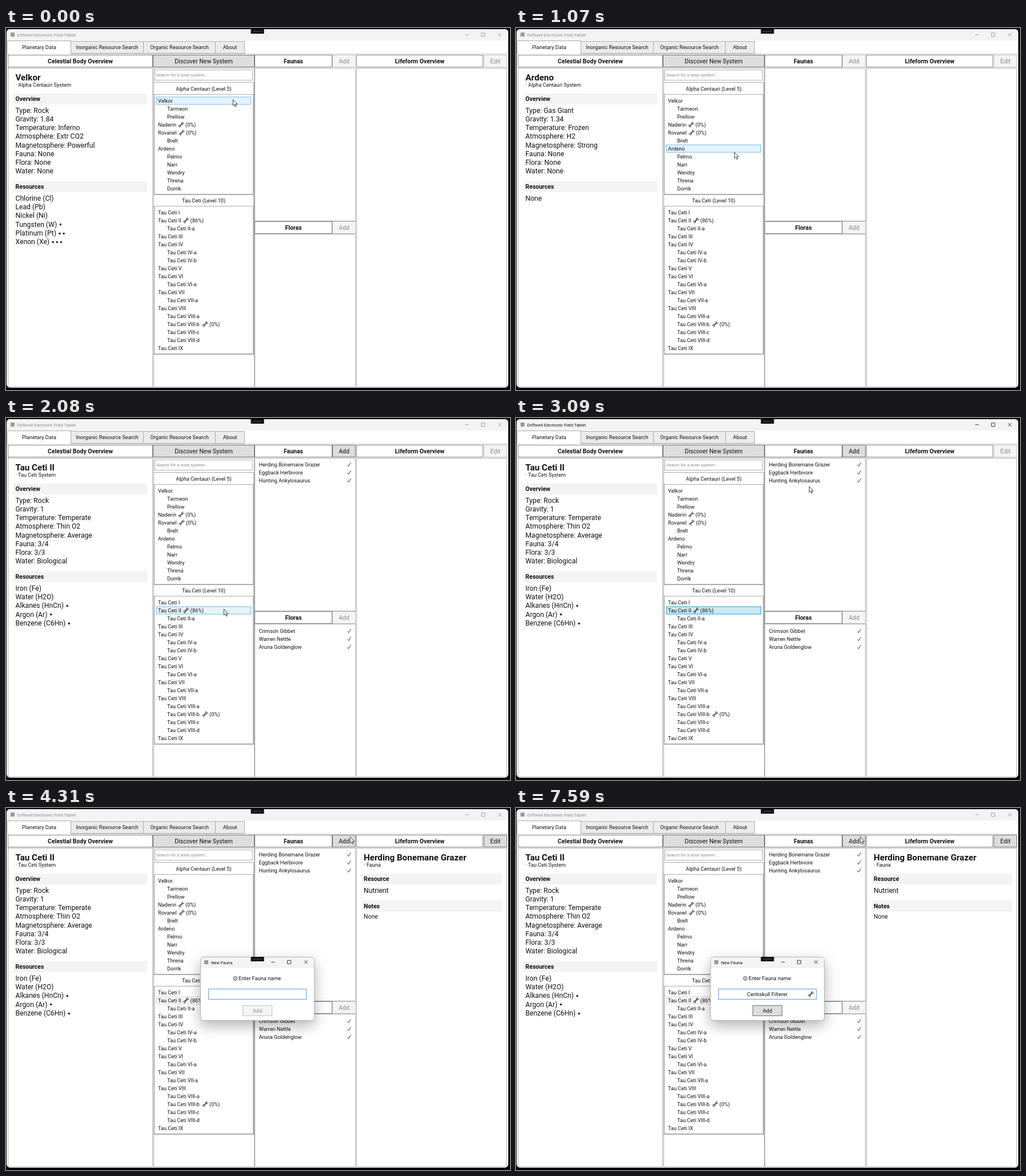
Write an HTML page that moves like this. It is 882 px wide and 635 px high and loops after 8 s.

```html
<!DOCTYPE html>
<html lang="en">
<head>
<meta charset="utf-8">
<title>Planet browser</title>
<style>
html, body { margin: 0; width: 100%; height: 100%; overflow: hidden; background: #000; }
svg { display: block; width: 882px; height: 635px; }
text { font: 9.2px Roboto, sans-serif; fill: #111; white-space: pre; }
.t { font-size: 7.5px; }
.m { font-size: 10.5px; }
.l { font-size: 12.16px; }
.h { font-size: 15.2px; }
.b { font-weight: 700; }
.c { text-anchor: middle; }
.off { fill: #8a8a8a; }
.dot { font: 5.5px "DejaVu Sans", sans-serif; }
.line { fill: none; stroke: #222; stroke-width: .9; }
#bar text { fill: #8c8c8c; }
#bar .line { stroke: #999; }
#bar.on text { fill: #111; }
#bar.on .line { stroke: #222; }
#box { filter: drop-shadow(0 9px 12px rgba(0, 0, 0, .3)); }
</style>
</head>
<body>
<svg viewBox="0 0 882 635">
  <defs>
    <g id="dna" fill="none" stroke="#222" stroke-width=".9" transform="rotate(-45)">
      <path d="M-5.5-1.9C-1.5-1.9 1.5 1.9 5.5 1.9M-5.5 1.9C-1.5 1.9 1.5-1.9 5.5-1.9M-4.2-1.8V1.8M-2.6-1.3V1.3M2.6-1.3V1.3M4.2-1.8V1.8"/>
    </g>
  </defs>
  <g id="base"></g>
  <g id="bar"></g>
  <g id="live"></g>
  <g id="lists"></g>
  <g id="dialog">
    <g id="box"></g>
    <g id="entry"></g>
  </g>
  <path id="mouse" d="M0 0V10.6L2.4 8.4 4.1 12.3 5.7 11.6 4.1 7.8H7.4Z" fill="#fff" stroke="#111" stroke-width=".8"/>
</svg>
<script>
const LOOP = 8000, STEP = 67;
const $ = id => document.getElementById(id);
const T = (x, y, s, cls = '') => `<text x="${x}" y="${y}" class="${cls}">${s}</text>`;
const R = (x, y, w, h, fill, stroke = 'none', more = '') =>
  `<rect x="${x + .5}" y="${y + .5}" width="${w - 1}" height="${h - 1}" fill="${fill}" stroke="${stroke}" ${more}/>`;
const fillRect = (x, y, w, h, fill) => `<rect x="${x}" y="${y}" width="${w}" height="${h}" fill="${fill}"/>`;
const dna = (x, y) => `<use href="#dna" x="0" y="0" transform="translate(${x} ${y})"/>`;
const tick = y => `<path class="line" d="M597.5 ${y + .5}l2 2.8 4-6.6"/>`;
const button = (x, y, w, h, label, on, cls = 'm', hover = false) =>
  R(x, y, w, h, hover ? '#bee6fd' : on ? '#ddd' : '#f4f4f4', hover ? '#3c7fb1' : on ? '#707070' : '#c0c3c5') +
  T(x + w / 2, y + h / 2 + 3.7, label, `c ${cls}${on ? '' : ' off'}`);
const controls = (min, max, close, y) =>
  `<path class="line" d="M${min - 3} ${y}h6.4M${max - 3} ${y - 3}h6v6h-6zM${close - 3} ${y - 3}l6 6m0-6l-6 6"/>`;
const grip = y => fillRect(428.5, y, 23, 8, '#111') + fillRect(433, y + 3.5, 14, 1, '#555');

// name; type; gravity; temperature; atmosphere; magnetosphere; fauna; flora; water; resources
const ALPHA = `Velkor;Rock;1.84;Inferno;Extr CO2;Powerful;None;None;None;Chlorine (Cl),Lead (Pb),Nickel (Ni),Tungsten (W)*,Platinum (Pt)**,Xenon (Xe)***
-Tarmeon;Rock;0.17;Inferno;None;None;None;None;None;Nickel (Ni),Cobalt (Co)
-Prellow;Rock;0.21;Inferno;None;None;None;None;None;Iron (Fe),Lead (Pb)
Naderin@0%;Rock;0.96;Temperate;Std O2;Average;0/2;0/3;Safe;Water (H2O),Copper (Cu),Aluminum (Al)
Rovanel@0%;Rock;0.91;Temperate;Std O2;Average;0/5;0/4;Safe;Water (H2O),Lead (Pb),Argon (Ar)*
-Brelt;Ice;0.13;Cold;None;None;None;None;None;Water (H2O),Iron (Fe)
Ardeno;Gas Giant;1.34;Frozen;H2;Strong;None;None;None;None
-Pelmo;Ice;0.18;Frozen;None;None;None;None;None;Water (H2O),Chlorine (Cl)
-Narr;Rock;0.22;Frozen;None;None;None;None;None;Nickel (Ni),Cobalt (Co)
-Wendry;Rock;0.19;Frozen;None;None;None;None;None;Copper (Cu),Lead (Pb)
-Threna;Ice;0.43;Frozen;CO2;None;None;None;Heavy metal;Water (H2O),Argon (Ar)*,Benzene (C6Hn)*
-Dorrik;Ice;0.15;Frozen;None;None;None;None;None;Water (H2O),Iron (Fe)`;
const TAU = `I;Rock;0.62;Inferno;None;None;None;None;None;Iron (Fe),Lead (Pb)
II@86%;Rock;1;Temperate;Thin O2;Average;3/4;3/3;Biological;Iron (Fe),Water (H2O),Alkanes (HnCn)*,Argon (Ar)*,Benzene (C6Hn)*
-II-a;Rock;0.14;Temperate;None;None;None;None;None;Nickel (Ni),Cobalt (Co)
III;Rock;0.87;Cold;CO2;Weak;None;None;None;Copper (Cu),Chlorine (Cl)
IV;Gas Giant;1.21;Frozen;H2;Strong;None;None;None;None
-IV-a;Ice;0.16;Frozen;None;None;None;None;None;Water (H2O),Lead (Pb)
-IV-b\nV\nVI\n-VI-a\nVII\n-VII-a\nVIII\n-VIII-a\n-VIII-b@0%\n-VIII-c\n-VIII-d\nIX`;
const FAUNAS = ['Herding Bonemane Grazer', 'Eggback Herbivore', 'Hunting Ankylosaurus'];
const FLORAS = ['Crimson Gibbet', 'Warren Nettle', 'Aruna Goldenglow'];
const FIELDS = ['Type', 'Gravity', 'Temperature', 'Atmosphere', 'Magnetosphere', 'Fauna', 'Flora', 'Water'];

const parse = (src, system, prefix, top) => src.split('\n').map((row, i) => {
  const [head, ...info] = row.split(';');
  const [label, life] = head.split('@');
  const moon = label[0] === '-';
  return { name: prefix + label.slice(moon ? 1 : 0), moon, life, system, info, y: top + 14 * i };
});
const planets = [...parse(ALPHA, 'Alpha Centauri', '', 127.5), ...parse(TAU, 'Tau Ceti', 'Tau Ceti ', 323.5)];
const home = planets.find(p => p.life === '86%');
const iconX = { 'Naderin': 306.5, 'Rovanel': 307.5, 'Tau Ceti II': 315, 'Tau Ceti VIII-b': 348.5 };

const LINE = '#acacac', EDGE = '#858585';
$('base').innerHTML =
  `<rect x="1" y="2" width="878" height="629" rx="6" fill="#fff"/>` +
  `<path d="M1 22V8a6 6 0 0 1 6-6H873a6 6 0 0 1 6 6V22z" fill="#f3f3f3"/>` + grip(2) +
  [[113, 128, 'Inorganic Resource Search'], [240, 127, 'Organic Resource Search'], [366, 52, 'About']]
    .map(([x, w, s]) => R(x, 23, w, 22, '#ebebeb', LINE) + T(x + w / 2, 37, s, 'c')).join('') +
  fillRect(2, 45, 876, 1, '#c8c8c8') +
  R(2, 22, 112, 24, '#fff', LINE) + fillRect(3, 44, 110, 3, '#fff') + T(58, 36.6, 'Planetary Data', 'c') +
  [[3, 254, 70, 560], [258, 177, 70, 560], [435, 177, 70, 269], [435, 177, 361, 269], [613, 264, 70, 560]]
    .map(([x, w, y, h]) => R(x, y, w, h, '#fff', LINE)).join('') +
  [[3, 254, 47, 'Celestial Body Overview'], [435, 136, 47, 'Faunas'], [435, 136, 339, 'Floras'], [613, 222, 47, 'Lifeform Overview']]
    .map(([x, w, y, s]) => R(x, y, w, 22, '#fff', EDGE) + T(x + w / 2, y + 14.7, s, 'c m b')).join('') +
  button(257, 47, 178, 22, 'Discover New System', true) +
  R(260, 73, 172, 19, '#fff', '#abadb3') + T(263, 85.2, 'Search for a solar system...', 't off') +
  R(258, 95, 176, 198, '#fff', LINE) + R(258, 292, 176, 281, '#fff', LINE) +
  R(259, 116, 174, 176, '#fff', LINE) + R(259, 312, 174, 260, '#fff', LINE) +
  T(346, 110.4, 'Alpha Centauri (Level 5)', 'c') + T(346, 306.4, 'Tau Ceti (Level 10)', 'c');

$('bar').innerHTML = fillRect(8, 8, 7, 7, '#9a9a9a') +
  T(19.5, 14.8, 'Driftwell Electronic Field Tablet', 't') + controls(806.5, 835, 864, 11.8);

$('lists').innerHTML = planets.map(p => {
  const x = iconX[p.name];
  return T(p.moon ? 282 : 266, p.y + 3.2, p.name) +
    (p.life ? dna(x, p.y) + T(x + 7.5, p.y + 3.2, `(${p.life})`) : '');
}).join('');

$('box').innerHTML =
  R(340, 261, 200, 112, '#fff', '#b5b5b5', 'rx="5"') +
  `<path d="M341 281V267a5 5 0 0 1 5-5H534a5 5 0 0 1 5 5V281z" fill="#f3f3f3"/>` +
  fillRect(347, 267, 7, 7, '#9a9a9a') + T(359, 273.5, 'New Fauna', 't') + controls(467, 495.5, 525, 270.3) +
  `<circle cx="401.3" cy="299" r="3.2" class="line"/><path class="line" d="M401.3 298.4v2.6m0-4.2v.9"/>` +
  T(407, 302.2, 'Enter Fauna name:') + R(354, 317, 172, 19, '#fff', '#569de5');

// time, x, y of the pointer
const PATH = [[0, 397, 126], [800, 388, 182], [1070, 382, 218], [1340, 382, 263], [1740, 381, 398], [1810, 381, 398],
  [2080, 381, 335], [2690, 381, 335], [3050, 500, 130], [3200, 560, 84], [3370, 602, 51], [LOOP, 602, 51]];
const quantize = t => Math.floor((t + 10) / STEP) * STEP;
function pointer(t) {
  const i = Math.max(1, PATH.findIndex(k => k[0] >= t));
  const [a, b] = [PATH[i - 1], PATH[i]], u = (t - a[0]) / (b[0] - a[0]);
  return [a[1] + (b[1] - a[1]) * u, a[2] + (b[2] - a[2]) * u];
}
const CLICK = 2480, OPEN = 3570;

// The last thing pointed at stays on show.
function hoverState(t) {
  const s = { shown: planets[0], over: null, life: -1, lifeOver: -1 };
  for (let q = 0; q <= t; q += STEP) {
    const [x, y] = pointer(q);
    if (q < CLICK) {
      s.over = planets.find(p => Math.abs(y - p.y) <= 7) || null;
      s.shown = s.over || s.shown;
    }
    const row = Math.floor((y - 74.5) / 14);
    s.lifeOver = x > 441 && x < 607 && row >= 0 && row < 3 ? row : -1;
    if (s.lifeOver >= 0) s.life = s.lifeOver;
  }
  return s;
}

const heading = (x, y, w, s) => fillRect(x - 3.5, y - 13, w, 19, '#f3f3f3') + T(x, y, s, 'm b');
const dots = n => Array.from({ length: n }, (_, i) =>
  `<tspan class="dot" dx="${i ? 2.8 : 4}" dy="${i ? 0 : -2.2}">◆</tspan>`).join('');
const missing = s => s !== 'None' && s.split('/')[0] !== s.split('/')[1];

function overview(p) {
  const items = p.info[8].split(',');
  return T(16.5, 92, p.name, 'h b') + T(16.5, 103, `· ${p.system} System`) +
    heading(16.5, 128, 234, 'Overview') +
    FIELDS.map((f, i) => T(16.5, 148.8 + 15.2 * i, `${f}: ${p.info[i]}`, 'l')).join('') +
    heading(16.5, 282, 234, 'Resources') +
    items.map((s, i) => {
      const name = s.replace(/\*/g, '');
      return T(16.5, 303 + 15.2 * i, name + dots(s.length - name.length), 'l');
    }).join('');
}
const lifeform = name => T(626, 92, name, 'h b') + T(626, 103, '· Fauna') +
  heading(626, 128, 245, 'Resource') + T(626, 148.8, 'Nutrient', 'l') +
  heading(626, 175.5, 245, 'Notes') + T(626, 194, 'None', 'm');

function live(t, s) {
  const [x, y] = pointer(quantize(t)), p = s.shown;
  const overAdd = t < OPEN && x > 571 && x < 611 && y > 47 && y < 69;
  const colors = t >= OPEN ? ['#f6f6f6', '#dadada'] : t >= CLICK ? ['#cbe8f6', '#26a0da'] : ['#e5f3fb', '#70c0e7'];
  let out = s.over ? R(263, s.over.y - 7, 166, 14, ...colors) : '';
  if (s.lifeOver >= 0) out += R(440, 74 + 14 * s.lifeOver, 168, 14, '#e5f3fb', '#70c0e7');
  out += overview(p) +
    button(571, 47, 41, 22, 'Add', missing(p.info[5]), 'm', overAdd) +
    button(571, 339, 41, 22, 'Add', missing(p.info[6])) +
    button(836, 47, 41, 22, 'Edit', s.life >= 0);
  if (p === home) {
    const rows = (names, top) => names.map((n, i) => T(442.5, top + 14 * i + 3.2, n) + tick(top + 14 * i)).join('');
    out += rows(FAUNAS, 81.5) + rows(FLORAS, 373.5);
  }
  return out + (s.life >= 0 ? lifeform(FAUNAS[s.life]) : '');
}

// moment of each key press
const KEYS = [4640, 4770, 4840, 5040, 5110, 5310, 5380, 5640, 5650, 5850, 5910, 6120, 6190, 6250, 6320, 6520, 6590, 6920, 6990];
const NAME = 'Centiskull Filterer';
function entry(t) {
  const n = KEYS.filter(k => t >= k).length, done = n === NAME.length;
  const typed = done ? NAME : NAME.toLowerCase().slice(0, n);
  const caret = !(t >= 4310 && t < 4640) && t < 7590;
  $('entry').innerHTML = T(440, 330, typed, 'c') + (done ? dna(516, 326.5) : '') +
    button(414, 346, 52, 19, 'Add', n > 0, '') + (t >= 3900 ? grip(261) : '');
  if (caret) {
    const w = n ? $('entry').firstChild.getComputedTextLength() : 0;
    $('entry').insertAdjacentHTML('beforeend', fillRect(440 + w / 2, 321, 1, 12, '#111'));
  }
}

let last = '';
function draw(t) {
  const q = quantize(t), [x, y] = pointer(Math.min(q, LOOP));
  const html = live(t, hoverState(q));
  if (html !== last) $('live').innerHTML = last = html;
  $('bar').setAttribute('class', t >= CLICK && t < OPEN ? 'on' : '');
  $('mouse').setAttribute('transform', `translate(${x + .3} ${y - .3})`);
  const open = t >= OPEN, p = Math.min(1, Math.max(0, (q - 3510) / 270)), k = .87 + .13 * p ** 1.5;
  $('dialog').setAttribute('display', open ? 'inline' : 'none');
  if (open) {
    $('dialog').setAttribute('opacity', p);
    $('dialog').setAttribute('transform', `translate(440 317) scale(${k}) translate(-440 -317)`);
    entry(t);
  }
}
const start = performance.now();
function frame() {
  draw((performance.now() - start) % LOOP);
  requestAnimationFrame(frame);
}
frame();
</script>
</body>
</html>
```
